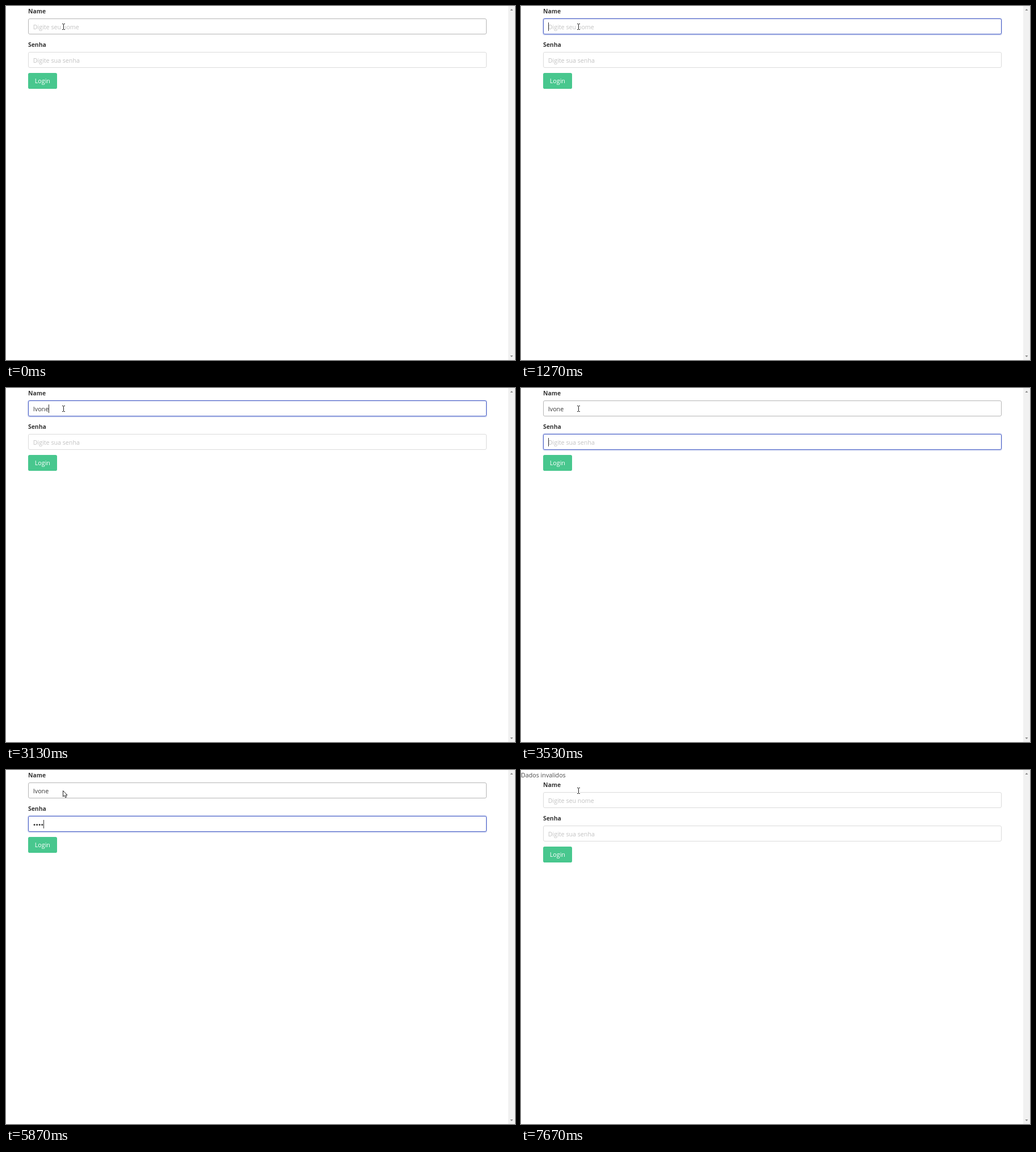
An HTML page for the animation above (8000 ms loop, 897 px wide and 624 px high).

```html
<!DOCTYPE html>
<html lang="pt">
<head>
<meta charset="utf-8">
<title>Login</title>
<style>
  html, body { margin: 0; width: 100%; height: 100%; overflow: hidden; background: #fff; }
  svg { display: block; }
  text { font: 10.7px "Open Sans", "Noto Sans", sans-serif; fill: #363636; white-space: pre; }
  .label { font-size: 10.4px; font-weight: 700; }
  .hint { fill: #363636; fill-opacity: .3; }
  .box { fill: #fff; stroke: #dbdbdb; }
  .hover .box { stroke: #b5b5b5; }
  .focus .box { stroke: #485fc7; }
  .halo { fill: #485fc7; fill-opacity: .25; visibility: hidden; }
  .focus .halo { visibility: visible; }
</style>
</head>
<body>
<svg width="897" height="624" viewBox="0 0 897 624">
  <text id="error" x="0" y="13" style="fill:#4a4a4a">Dados invalidos</text>

  <g id="form">
    <g id="name">
      <text class="label" x="39" y="13">Name</text>
      <rect class="halo" x="38" y="21" width="810" height="30.8" rx="4"/>
      <rect class="box" x="39.5" y="22.5" width="807" height="27" rx="2.4"/>
      <text class="hint" x="47.8" y="41">Digite seu nome</text>
      <text class="value" x="47.8" y="41"></text>
    </g>
    <g id="password">
      <text class="label" x="39" y="72">Senha</text>
      <rect class="halo" x="38" y="79.8" width="810" height="30.8" rx="4"/>
      <rect class="box" x="39.5" y="81.5" width="807" height="27" rx="2.4"/>
      <text class="hint" x="47.8" y="100">Digite sua senha</text>
      <g class="value" fill="#363636"></g>
    </g>
    <rect x="39" y="118" width="51" height="28" rx="2.8" fill="#48c78e"/>
    <text x="50.8" y="136" style="fill:#fff">Login</text>
    <rect id="caret" width="1" height="15" fill="#363636"/>
  </g>

  <g id="beam" fill="none">
    <path d="M101.5 32V41" stroke="#fff" stroke-width="5"/>
    <path d="M99 31.5H101M102 31.5H104M101.5 32V41M99 41.5H101M102 41.5H104" stroke="#222"/>
  </g>
  <path id="arrow" d="M100.5 36.5V47L103 44.8L104.7 48.5L106.6 47.6L105 44.2H108Z" fill="#fff" stroke="#222"/>

  <rect x="885" width="12" height="624" fill="#f1f1f1"/>
  <path d="M888.5 8L891 5L893.5 8ZM888.5 616L891 619L893.5 616Z" fill="#8a8a8a"/>
</svg>
<script>
const LOOP = 8000, NAME = "Ivone", LEFT = 47.8, DOT = 4.55;
const FOCUS_NAME = 200, FOCUS_PASSWORD = 3530, SUBMIT = 7670;
const nameKeys = [1730, 2600, 2730, 2930, 3130];
const passwordKeys = [4400, 4670, 4930, 5600];
const caretOff = [[730, 1270], [2270, 2600], [4070, 4400], [5470, 5600]];

const $ = selector => document.querySelector(selector);
const show = (el, on) => el.style.visibility = on ? "visible" : "hidden";
const within = (t, from, to) => t >= from && t < to;
const typed = (keys, t) => t < SUBMIT ? keys.filter(k => k <= t).length : 0;

const nameField = $("#name"), passwordField = $("#password");
const nameValue = $("#name .value"), dots = $("#password .value");
const caret = $("#caret");

dots.innerHTML = passwordKeys.map((_, i) =>
  `<circle cx="${LEFT + DOT * (i + .5)}" cy="96.4" r="1.5"/>`).join("");

function render(t) {
  const sent = t >= SUBMIT;
  const onName = within(t, FOCUS_NAME, FOCUS_PASSWORD);
  const onPassword = within(t, FOCUS_PASSWORD, SUBMIT);
  const letters = typed(nameKeys, t), bullets = typed(passwordKeys, t);

  nameField.classList.toggle("hover", !sent);
  nameField.classList.toggle("focus", onName);
  passwordField.classList.toggle("focus", onPassword);
  show($("#name .hint"), !letters);
  show($("#password .hint"), !bullets);
  nameValue.textContent = NAME.slice(0, letters);
  [...dots.children].forEach((dot, i) => show(dot, i < bullets));

  const width = onName ? (letters && nameValue.getComputedTextLength()) : bullets * DOT;
  caret.setAttribute("x", Math.round(LEFT + width));
  caret.setAttribute("y", onName ? 29 : 88);
  show(caret, (onName || onPassword) && !caretOff.some(([a, b]) => within(t, a, b)));

  const pointing = within(t, 5870, 7530);
  show($("#arrow"), pointing);
  show($("#beam"), !pointing);
  show($("#error"), sent);
  $("#form").setAttribute("transform", `translate(0 ${sent ? 17 : 0})`);
}

const start = performance.now();
function frame() {
  render((performance.now() - start) % LOOP);
  requestAnimationFrame(frame);
}
frame();
</script>
</body>
</html>
```
